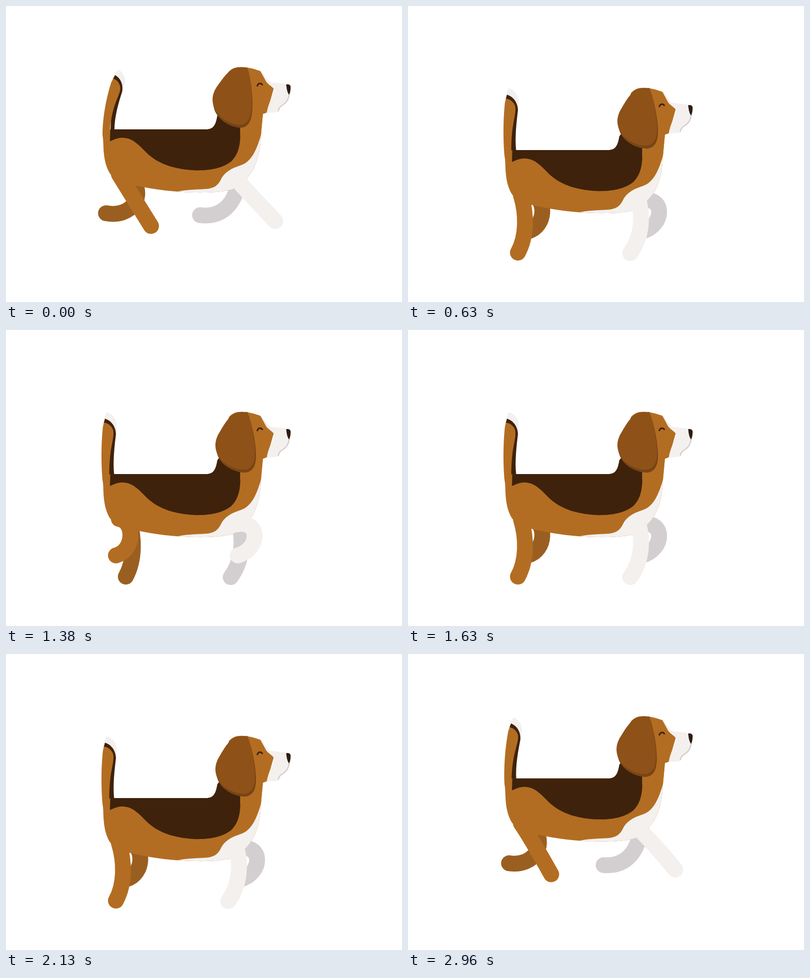
Write an HTML page with a canvas that moves like this. It is 800 by 600 pixels and loops after 3000 ms.

```html
<!DOCTYPE html>
<html lang="en">
<head>
<meta charset="utf-8">
<title>Walking dog</title>
<style>
html, body { margin: 0; width: 100%; height: 100%; overflow: hidden; background: #fff; }
canvas { display: block; width: 800px; height: 600px; }
</style>
</head>
<body>
<canvas id="stage" width="800" height="600"></canvas>
<script>
const ctx = document.getElementById("stage").getContext("2d");

const BROWN = "#b36d22", DARK = "#3e220c", WHITE = "#f3f0ee";
const EAR = "#8e5118", EAR_EDGE = "#784516";
const FAR_BROWN = "#9a5f20", FAR_WHITE = "#d3cfd1";

const FPS = 24, STRIDE = 12, HALF = STRIDE / 2;

// Each pose holds two bend points and the paw.
const hind = {
  hip: [228, 341], farShift: 20, kick: 18,
  reach: [250, 376, 271, 411, 293, 446],
  stance: [240, 380, 240, 425, 222, 458],
  trail: [268, 385, 232, 430, 182, 420],
  swing: [260, 345, 260, 405, 222, 415]
};
const fore = {
  hip: [466, 352], farShift: 5, kick: 0,
  reach: [492, 381, 518, 408, 544, 436],
  stance: [474, 382, 474, 425, 449, 459],
  trail: [459, 395, 437, 430, 387, 424],
  swing: [515, 343, 513, 403, 468, 415]
};

const body = "M196 258 C197 290 196 318 211 341 C222 352 240 360 262 364 " +
  "C300 372 340 377 380 378 C420 379 450 375 462 370 C490 350 512 330 515 262 " +
  "L519 218 L440 205 L427 222 C424 240 420 250 404 250 L211 250 Z";
const chest = "M515 262 C507 288 498 315 474 323 C455 329 440 338 434 352 " +
  "C428 364 420 370 402 371 C380 372 362 373 347 376 L347 400 L530 400 L530 262 Z";
const saddle = "M473 200 L473 245 C475 280 470 300 455 315 C435 331 405 334 380 333 " +
  "C340 331 310 320 290 303 C272 287 260 268 236 267 C222 267 215 273 210 274 " +
  "L211 240 L420 200 Z";

const head = "M450 135 C458 125 468 123 480 124 C495 125 506 129 514 132 " +
  "L541 167 L527 216 L519 219 L515 262 L473 262 L473 215 L450 200 Z";
const muzzle = "M514 132 C521 135 523 145 529 151 C536 157 555 155 568 159 L573 180 " +
  "C572 192 567 197 560 201 C553 206 552 208 551 213 C549 216 540 216 527 216 " +
  "C529 199 538 186 542 171 C541 165 533 162 526 154 C522 147 518 139 514 132 Z";
const nose = "M566 159 C571 158 575 160 575 164 C575 171 574 176 572 180 " +
  "C568 175 567 168 566 159 Z";
const ear = "M447 137 C455 126 465 124 475 124 L488 125 " +
  "C493 145 497 170 497 195 C497 226 490 240 472 241 C450 239 429 225 421 207 " +
  "C415 190 418 178 425 166 C432 156 439 145 447 137 Z";

const tail = "M195 262 C195 235 200 195 213 155 C216 147 221 135 227 129 " +
  "C239 134 244 150 239 162 L235 174 C228 195 219 225 219 252 L212 275 L197 275 Z";
const tailStripe = "M217 147 L221 140 C231 146 238 158 235 174 " +
  "C228 195 219 225 219 252 L210 274 Z";
const tailBrown = "M195 262 C195 235 200 195 213 155 L217 147 C222 149 227 152 230 160 " +
  "C234 168 228 180 222 195 C214 215 208 250 210 274 L197 275 Z";

function fill(path, color) {
  ctx.fillStyle = color;
  ctx.fill(new Path2D(path));
}

function stroke(path, color, width) {
  ctx.strokeStyle = color;
  ctx.lineWidth = width;
  ctx.stroke(new Path2D(path));
}

const wave = (step, peak) => Math.cos((step - peak) * 2 * Math.PI / HALF);

// 0 when the legs are spread, 1 when they pass; lingers while spread.
function passing(step) {
  const part = step % HALF;
  return (Math.min(part, HALF - part) * 2 / HALF) ** 2.7;
}

function legPose(leg, step) {
  const spread = Math.round(step / HALF) % 2 ? leg.trail : leg.reach;
  const middle = step < HALF ? leg.stance : leg.swing;
  const mix = passing(step);
  const pose = spread.map((v, i) => v + (middle[i] - v) * mix);
  const kick = leg.kick * Math.max(0, wave(step, HALF / 4));
  pose[3] += kick / 2;
  pose[5] += kick;
  return pose;
}

function drawLeg(leg, step, color, shift = 0) {
  ctx.save();
  ctx.translate(shift, 0);
  ctx.beginPath();
  ctx.moveTo(...leg.hip);
  ctx.bezierCurveTo(...legPose(leg, step % STRIDE));
  ctx.lineWidth = 32;
  ctx.lineCap = "round";
  ctx.strokeStyle = color;
  ctx.stroke();
  ctx.restore();
}

// Sways a path about its root, more strongly towards the top.
function bend(path, amount) {
  return path.replace(/(\d+) (\d+)/g, (pair, x, y) => {
    const height = Math.max(0, 262 - y) / 133;
    const slope = 1.5 * amount / 133 * Math.sqrt(height);
    const newX = +x + amount * height ** 1.5;
    const newY = +y + (x - 212) * slope;
    return newX.toFixed(2) + " " + newY.toFixed(2);
  });
}

function drawTail(step) {
  const sway = -12.3 + 15 * wave(step, 0.65);
  fill(bend(tail, sway), WHITE);
  fill(bend(tailStripe, sway), DARK);
  fill(bend(tailBrown, sway), BROWN);
}

function drawMarkings(path, color) {
  ctx.save();
  ctx.clip(new Path2D(body));
  fill(path, color);
  ctx.restore();
}

function drawHead(step) {
  fill(head, BROWN);
  fill(muzzle, WHITE);
  stroke("M572 179 C571 190 566 196 560 200 C553 204 551 207 550 213", FAR_WHITE, 2.5);
  fill(nose, "#2f1c12");
  stroke("M507.5 163 C509 156 515 155 518.5 160.5", DARK, 3);

  const swing = -2.1 + 3.6 * wave(step, 0.75);
  ctx.save();
  ctx.translate(480, 126);
  ctx.rotate(swing * Math.PI / 180);
  ctx.translate(-478.5, -120);
  fill(ear, EAR_EDGE);
  ctx.translate(-1.5, -6);
  fill(ear, EAR);
  ctx.restore();
}

function drawDog(step) {
  ctx.fillStyle = "#fff";
  ctx.fillRect(0, 0, 800, 600);
  ctx.save();
  ctx.translate(0, 42 * passing(step));
  drawLeg(hind, step + HALF, FAR_BROWN, hind.farShift);
  drawLeg(fore, step + HALF, FAR_WHITE, fore.farShift);
  drawTail(step);
  fill(body, BROWN);
  drawLeg(hind, step, BROWN);
  drawMarkings(chest, WHITE);
  drawLeg(fore, step, WHITE);
  drawMarkings(saddle, DARK);
  drawHead(step);
  ctx.restore();
}

const start = performance.now();

function tick(now) {
  const time = Math.max(0, now - start) % 3000;
  // Steps land on the nearest hundredth of a second.
  const tens = Math.floor(time / 10) * 10;
  drawDog(Math.floor((tens + 4.9) * FPS / 1000) % STRIDE);
  requestAnimationFrame(tick);
}
tick(start);
</script>
</body>
</html>
```
